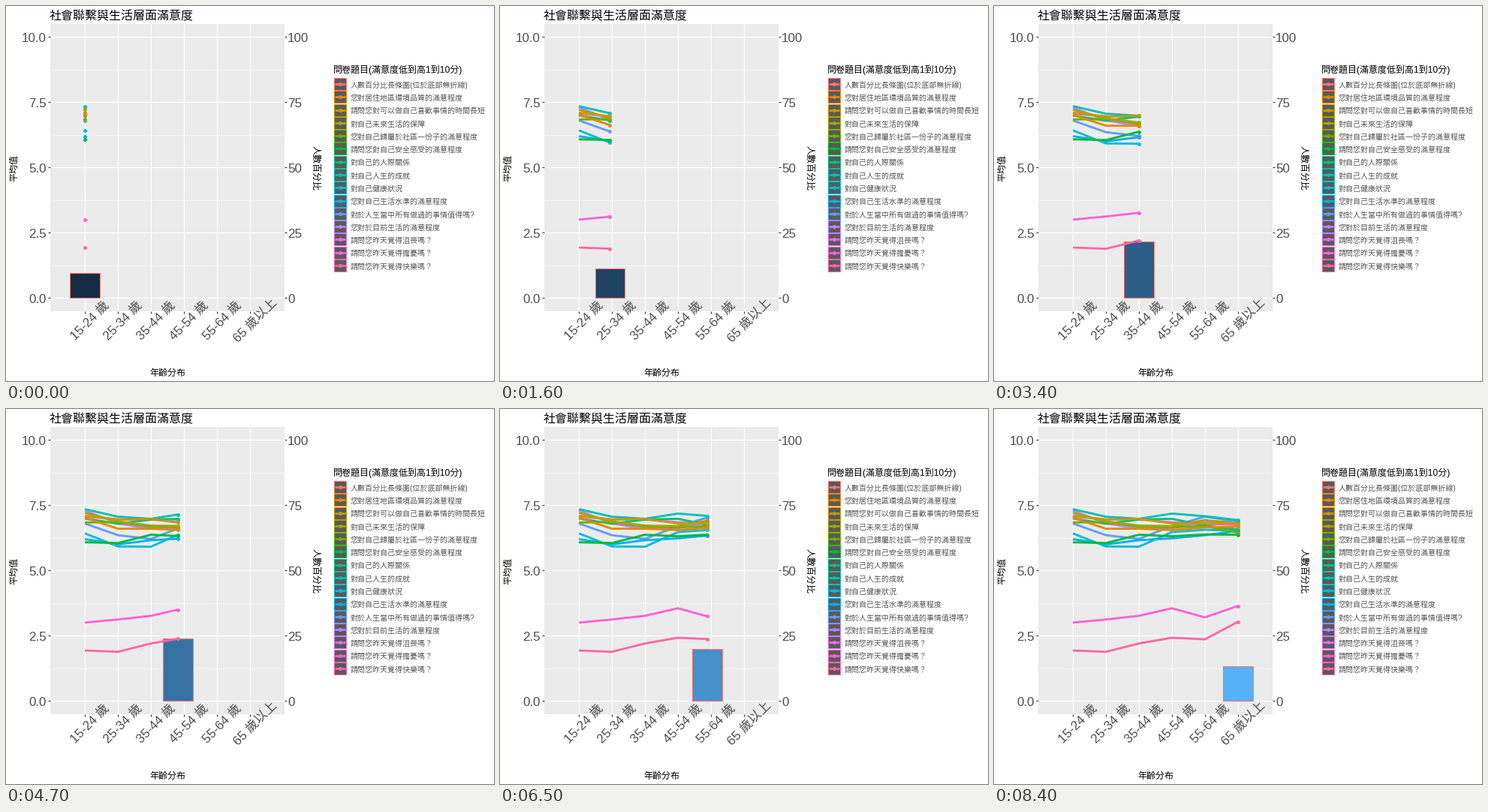
A matplotlib script that plays this animation: 650x500 px, repeating every 10 s.

```python
import numpy as np
import matplotlib.pyplot as plt
from matplotlib.animation import FuncAnimation
from matplotlib.patches import Rectangle

W, H, DPI = 650, 500, 72
FONTS = ["Liberation Sans", "Noto Sans CJK JP"]
plt.rcParams["font.family"] = FONTS

LEFT, RIGHT, TOP, BOTTOM = 59, 371, 24, 406.5
STEP = (RIGHT - LEFT) / 7.1
BAR_W = 0.9 * STEP
KEY_FRAMES = [0, 17, 34, 50, 67, 84]
AGES = ["15-24 歲", "25-34 歲", "35-44 歲", "45-54 歲", "55-64 歲", "65 歲以上"]

QUESTIONS = [
    ("人數百分比長條圖(位於底部無折線)", "#F8766D"),
    ("您對居住地區環境品質的滿意程度", "#E58700"),
    ("請問您對可以做自己喜歡事情的時間長短", "#C99800"),
    ("對自己未來生活的保障", "#A3A500"),
    ("您對自己歸屬於社區一份子的滿意程度", "#6BB100"),
    ("請問您對自己安全感受的滿意程度", "#00BA38"),
    ("對自己的人際關係", "#00BF7D"),
    ("對自己人生的成就", "#00C0AF"),
    ("對自己健康狀況", "#00BCD8"),
    ("您對自己生活水準的滿意程度", "#00B0F6"),
    ("對於人生當中所有做過的事情值得嗎?", "#619CFF"),
    ("您對於目前生活的滿意程度", "#B983FF"),
    ("請問您昨天覺得沮喪嗎？", "#E76BF3"),
    ("請問您昨天覺得擔憂嗎？", "#FD61D1"),
    ("請問您昨天覺得快樂嗎？", "#FF67A4"),
]
SHARES = [0.95, 1.13, 2.16, 2.44, 1.93, 1.33]
SCORES = [
    [7.02, 6.60, 6.60, 6.55, 6.65, 6.68],
    [7.10, 6.95, 6.98, 6.80, 6.80, 6.80],
    [7.21, 6.88, 6.72, 6.70, 6.93, 6.80],
    [6.84, 6.85, 6.68, 6.66, 6.70, 6.45],
    [6.08, 6.05, 6.37, 6.31, 6.38, 6.37],
    [6.99, 6.79, 6.95, 6.98, 6.72, 6.57],
    [7.35, 7.06, 6.98, 7.18, 7.08, 6.93],
    [6.42, 5.92, 5.91, 6.47, 6.56, 6.52],
    [6.20, 6.00, 6.16, 6.23, 6.35, 6.52],
    [6.80, 6.35, 6.21, 6.70, 7.06, 6.88],
    [7.30, 6.80, 6.60, 6.62, 6.85, 6.90],
    [7.06, 6.96, 6.95, 6.85, 6.78, 6.75],
    [3.00, 3.12, 3.26, 3.55, 3.20, 3.64],
    [1.93, 1.88, 2.20, 2.42, 2.36, 3.03],
]


def x_px(age):
    return LEFT + (1.05 + np.asarray(age)) * STEP


def y_px(value):
    return BOTTOM - (np.asarray(value) + 0.5) * (BOTTOM - TOP) / 11


def fill_color(t):
    low, high = np.array([19, 43, 67]), np.array([86, 177, 247])
    sag = 4 * t * (1 - t) * np.array([1.5, 4, 5])
    return tuple((low + (high - low) * t - sag) / 255)


fig = plt.figure(figsize=(W / DPI, H / DPI), dpi=DPI, facecolor="white")
ax = fig.add_axes([0, 0, 1, 1])
ax.set(xlim=(0, W), ylim=(H, 0))
ax.axis("off")


def label(x, y, text, size, color="black", ha="left"):
    ax.text(x, y + 0.36 * size, text, size=size, color=color, ha=ha, va="baseline", zorder=9)


def turned(x, y, text, size, angle, color="black"):
    ax.text(x, y, text, size=size, color=color, rotation=angle, ha="center", va="center", zorder=9)


def stroke(xs, ys, color, width, z):
    return ax.plot(xs, ys, color=color, lw=width, solid_capstyle="butt",
                   solid_joinstyle="round", zorder=z)[0]


def draw_panel():
    ax.add_patch(Rectangle((LEFT, TOP), RIGHT - LEFT, BOTTOM - TOP, fc="#EBEBEB", lw=0, zorder=0))
    for v in (1.25, 3.75, 6.25, 8.75):
        stroke([LEFT, RIGHT], [y_px(v)] * 2, "white", 0.55, 1)
    for v in (0, 2.5, 5, 7.5, 10):
        y = y_px(v)
        stroke([LEFT, RIGHT], [y, y], "white", 1.07, 1)
        stroke([LEFT - 3, LEFT], [y, y], "#333333", 1.07, 1)
        stroke([RIGHT, RIGHT + 3], [y, y], "#333333", 1.07, 1)
        label(54, y + 0.3, f"{v:.1f}", 17, "#4D4D4D", "right")
        label(375, y + 0.8, f"{v * 10:.0f}", 17, "#4D4D4D")
    for i, age in enumerate(AGES):
        x = x_px(i)
        stroke([x, x], [TOP, BOTTOM], "white", 1.07, 1)
        stroke([x, x], [BOTTOM, BOTTOM + 3], "#333333", 1.07, 1)
        turned(x + 7.3, 419.5, age, 17, 45, "#4D4D4D")
    label(58, 12.5, "社會聯繫與生活層面滿意度", 16)
    label(215, 489, "年齡分布", 12, ha="center")
    turned(11, 216.5, "平均值", 12, 90)
    turned(411.5, 215.5, "人數百分比", 12, -90)


def draw_legend():
    label(436, 85, "問卷題目(滿意度低到高1到10分)", 12)
    for i, (text, color) in enumerate(QUESTIONS):
        y = 104 + 17.28 * i
        ax.add_patch(Rectangle((436, y - 8.64), 17.28, 17.28, fc="#F2F2F2", lw=0, zorder=1))
        ax.add_patch(Rectangle((436.8, y - 8), 16, 16, fc="#595959", ec=color, lw=1.07, zorder=2))
        stroke([437.8, 451.6], [y, y], color, 2.85, 3)
        ax.plot(444.7, y, "o", ms=5, mew=0, color=color, zorder=4)
        label(459, y + 1, text, 10, "#555555")


draw_panel()
draw_legend()

bar = ax.add_patch(Rectangle((0, 0), BAR_W, 1, ec=QUESTIONS[0][1], lw=1.07, zorder=3))
lines, dots = [], []
for k, (_, color) in enumerate(QUESTIONS[1:]):
    lines.append(stroke([], [], color, 2.85, 5 - k / 100))
    dots.append(ax.plot([], [], "o", ms=5, mew=0, color=color, zorder=6 - k / 100)[0])


def update(frame):
    pos = np.interp(frame, KEY_FRAMES, range(6))
    ages = np.append(np.arange(np.ceil(pos)), pos)
    top = y_px(np.interp(pos, range(6), SHARES))
    bar.set_xy((x_px(pos) - BAR_W / 2, top))
    bar.set_height(y_px(0) - top)
    bar.set_facecolor(fill_color(pos / 5))
    for line, dot, scores in zip(lines, dots, SCORES):
        ys = y_px(np.interp(ages, range(6), scores))
        line.set_data(x_px(ages), ys)
        dot.set_data([x_px(pos)], [ys[-1]])
    return [bar, *lines, *dots]


anim = FuncAnimation(fig, update, frames=100, interval=100, repeat=True, repeat_delay=0, blit=False)
plt.show()
```
